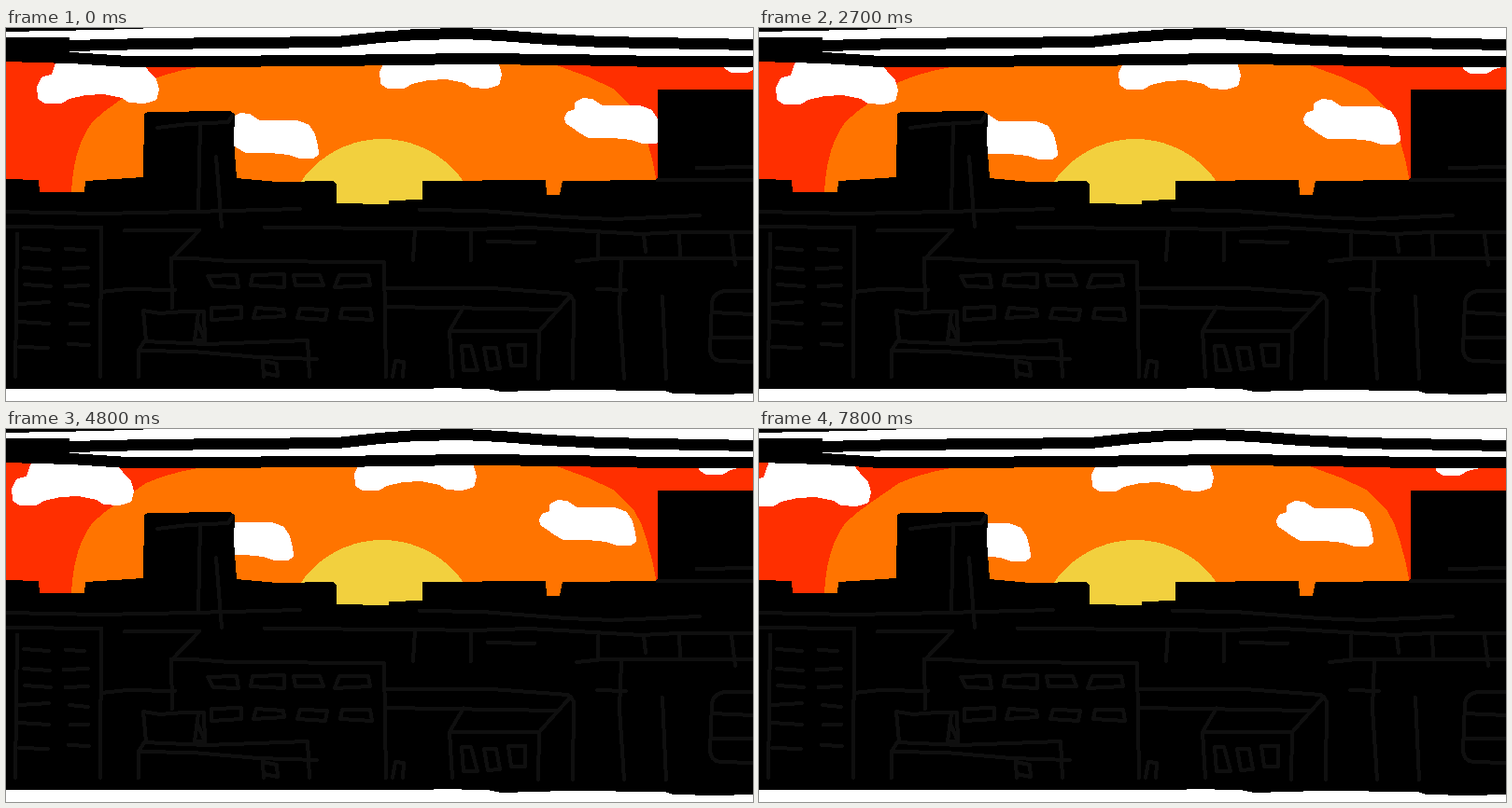
An HTML page for the animation above (8000 ms loop, 800 by 400 pixels).

```html
<!DOCTYPE html>
<html lang="en">
<head>
<meta charset="utf-8">
<title>Sunset over the city</title>
<style>
html, body { margin: 0; width: 100%; height: 100%; overflow: hidden; background: #fff; }
svg { display: block; width: 100%; height: 100%; }
.lines { fill: none; stroke: #0f0f0f; stroke-width: 4; stroke-linecap: round; stroke-linejoin: round; }
.bands { fill: none; stroke: #000; stroke-width: 12; stroke-linejoin: round; }
.cloud { fill: #fff; stroke: #fff; stroke-width: 8; stroke-linejoin: round; }
</style>
</head>
<body>
<svg viewBox="0 0 800 400" shape-rendering="crispEdges">
  <defs>
    <path id="wide" class="cloud" d="M37 64L41 56L52 53L58 36H140L150 49L157 56L160 66L158 74L148 77L133 76L125 71L105 67L85 68L67 72L58 77H43L38 74Z"/>
    <path id="puff" class="cloud" d="M602 97L604 93L613 90V82L619 79L627 80L637 87H678L689 91L694 99L697 110L698 118L695 120H682L670 116L650 114H625L616 109L608 103L603 100Z"/>
  </defs>

  <!-- sky -->
  <path fill="#ff2f00" d="M0 30H800V200H0Z"/>
  <path fill="#ff7400" d="M70 178C71 152 76 122 93 100C108 86 130 72 150 58Q172 48 205 42V36H580L590 40L625 53L650 65L662 76L673 88L681 103L687 122L693 145L697 165V180Z"/>
  <circle cx="403" cy="225" r="106" fill="#f2d03e"/>

  <g id="clouds">
    <use href="#wide"/>
    <use href="#wide" x="367" y="-16"/>
    <use href="#wide" x="735" y="-33"/>
    <use href="#puff"/>
    <use href="#puff" x="-367" y="16"/>
  </g>

  <!-- bands along the top -->
  <path d="M0 0H162L100 2L0 4ZM0 10H68V38L0 36Z"/>
  <path class="bands" d="M0 16L70 19L150 17L355 15L400 10L440 7L490 6L530 8L580 12L640 15L800 18M0 30L70 32L130 36H200L350 35L420 34L500 33L600 34L700 36H800"/>

  <!-- city -->
  <path d="M0 162L35 163L36 176H84L85 164L147 160L148 92L152 90L240 89L245 93L244 120L247 161L290 165L350 164L354 168V188L410 189V185L446 184V164L578 163L579 179H593L596 164L698 163V66H800V392L760 393L715 392L705 389L600 388L530 390L515 387L460 386L455 387H0Z"/>
  <g class="lines">
    <path d="M162 107L195 103L238 101L243 93M208 103L206 195M225 138L231 213M740 150L800 149M698 163H800"/>
    <path d="M0 197L100 199L200 197L315 194M443 195L510 196L600 203L650 205L743 201M277 214L440 215L500 216L560 214L680 221L720 219H800M438 216L436 249M498 217V249M516 229L566 230"/>
    <path d="M0 213L102 214L101 374M12 221L10 374M19 236L46 238M64 237L84 238M19 257L47 259M62 258L88 257M20 275L48 277M64 277L88 276M14 296L46 294M68 296L88 298M14 315L46 317M69 317H88M14 342L45 343M67 339L89 340"/>
    <path d="M102 283L130 280L181 281M127 217H207L178 247M178 300L177 247H200L240 250L405 251L407 374"/>
    <path d="M216 266L247 265L249 278L222 277ZM264 265L298 264V278L262 276ZM308 265H336L340 276H310ZM357 265H388L390 276L352 278ZM220 300L252 299V311L220 313ZM268 300L297 302L298 309L265 311ZM315 301L344 302L342 313L312 311ZM360 301H390L392 313L358 311Z"/>
    <path d="M150 335L147 303L165 306L190 304H212L213 337M206 305L202 335H213L206 318M142 374V346L148 336L215 339L323 335L325 374M142 346L200 347L270 353L333 355M276 374L275 357L290 360L291 373L276 370M414 374L417 357L426 358L425 374"/>
    <path d="M407 279H520L602 285L608 292L607 376M407 299L590 302M490 299L475 325L478 374M475 325H571L605 287M571 325L570 376M488 341H498L505 367H490ZM512 343H525L529 365L516 366ZM538 340H556V362H541Z"/>
    <path d="M634 222V247M683 222L685 240M721 219L722 245M777 222L781 254M611 250L640 247H800M659 250L657 300L662 376M703 288L707 376M633 280L664 281M800 282H770Q757 284 756 295L754 345Q755 356 765 357L800 358M756 305L800 307M756 332H800"/>
  </g>
</svg>
<script>
const LOOP = 8000, STEP = 300;
const clouds = document.getElementById('clouds');

function draw(now) {
  const step = Math.floor(now % LOOP / STEP);
  const dx = -Math.round(step * 1.69), dy = Math.round(step * 0.07);
  clouds.setAttribute('transform', `translate(${dx} ${dy})`);
  requestAnimationFrame(draw);
}
draw(performance.now());
</script>
</body>
</html>
```
